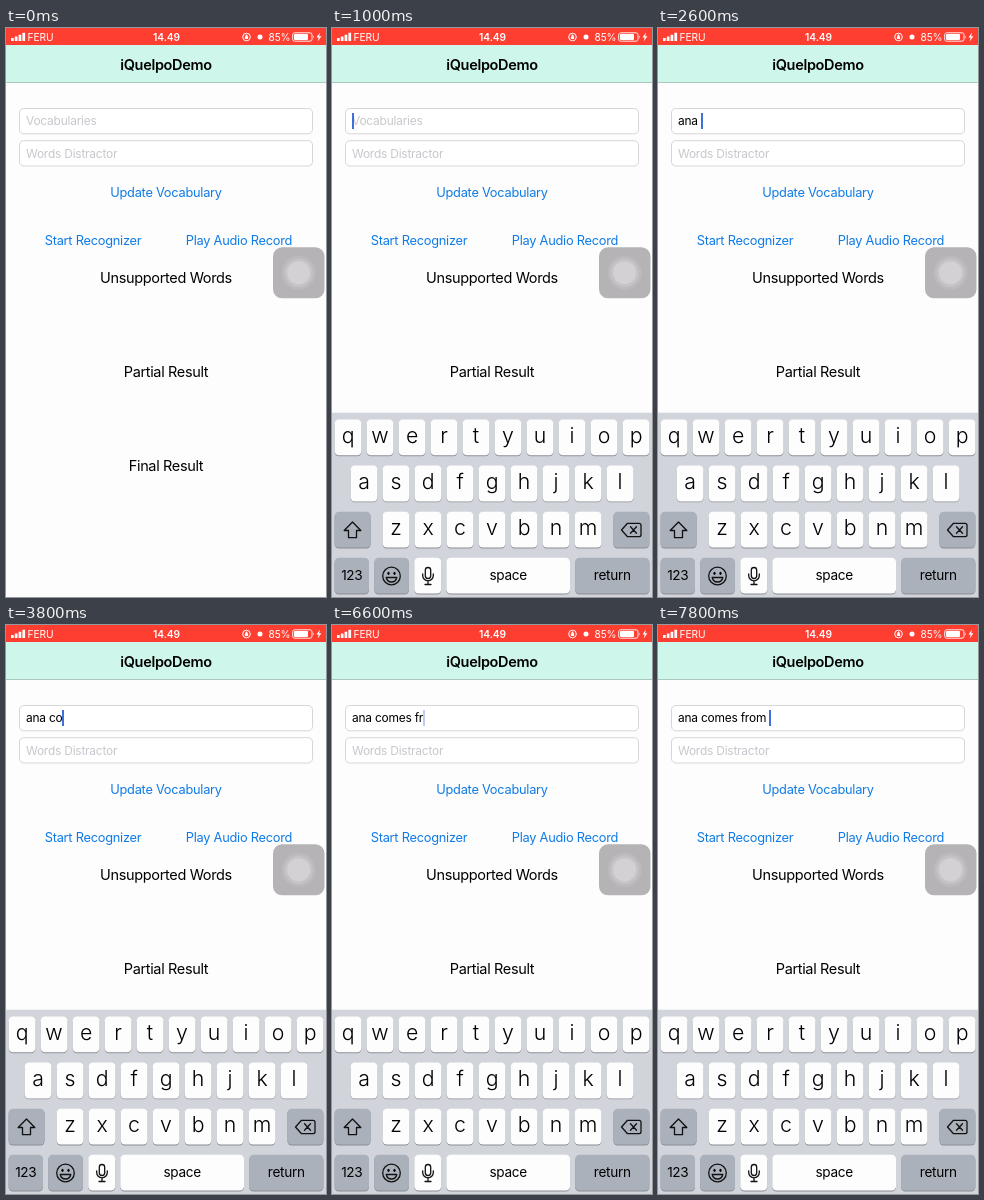
Recreate the animation shown at these times as an HTML page. Size 320 by 569 pixels, loop 8000 ms.

```html
<!DOCTYPE html>
<html lang="en">
<head>
<meta charset="utf-8">
<title>Recognizer demo</title>
<style>
  html, body { margin: 0; width: 100%; height: 100%; overflow: hidden; background: #fdfdfe; }
  #stage { position: absolute; left: 0; top: 0; width: 320px; height: 569px; overflow: hidden; }
  svg { position: absolute; left: 0; top: 0; }
  svg, #input { font-family: Inter, Roboto, "Liberation Sans", sans-serif; }
  text { text-anchor: middle; }
  .status text { font-size: 10.2px; fill: #fff; letter-spacing: -.1px; }
  .title { font-size: 14.5px; font-weight: 600; letter-spacing: -.33px; }
  .label { font-size: 14.5px; letter-spacing: -.35px; }
  .button { font-size: 12.8px; letter-spacing: -.25px; fill: #0f7be6; }
  .hint { font-size: 11.95px; letter-spacing: -.22px; fill: #c7c7cd; text-anchor: start; }
  .field { fill: #fff; stroke: #d6d6d9; }
  .letter { font-size: 21.3px; font-weight: 300; }
  .word { font-size: 13.6px; letter-spacing: -.3px; }
  .line { fill: none; stroke: #111; stroke-width: 1.3; stroke-linejoin: round; stroke-linecap: round; }
  #popup { filter: drop-shadow(0 1px 1.5px #0006); }
  #popup text { font-size: 32px; font-weight: 300; }
  #input {
    position: absolute; left: 20px; top: 85px; height: 16px; white-space: pre;
    font-size: 11.95px; line-height: 16px; letter-spacing: -.22px; color: #000;
  }
  #caret {
    position: absolute; left: 100%; top: 0; width: 1.8px; height: 15.5px;
    background: #3f6fdb;
  }
</style>
</head>
<body>
<div id="stage">
  <svg width="320" height="569" viewBox="0 0 320 569">
    <rect width="320" height="569" fill="#fdfdfe"/>
    <rect y="17" width="320" height="38" fill="#cef6ea"/>
    <rect y="54.2" width="320" height=".8" fill="#a3bdb6"/>
    <g class="status">
      <rect width="320" height="17" fill="#ff3e32"/>
      <path d="M5 10h2.7v3H5zM8.8 8.5h2.7V13H8.800zM12.600 6.700h2.700V13h-2.700zM16.400 4.700h2.700V13h-2.700z" fill="#fff"/>
      <text x="34.500" y="12.700">FERU</text>
      <text x="160.500" y="12.700" font-weight="600">14.49</text>
      <circle cx="240.500" cy="9" r="3.800" fill="none" stroke="#fff"/>
      <path d="M238.900 8.500h3.200v2.500h-3.200zM239.500 8.500v-1a1 1 0 0 1 2 0v1" fill="#fff"/>
      <circle cx="254" cy="9" r="2.500" fill="#fff"/>
      <text x="273.500" y="12.700">85%</text>
      <rect x="286.700" y="4.800" width="19.300" height="8.400" rx="2" fill="none" stroke="#fff" stroke-width=".9"/>
      <rect x="288" y="6.100" width="14" height="5.800" rx=".8" fill="#fff"/>
      <path d="M307 7.500q1.500 1.500 0 3zM314 4.500l-3.500 5h2.200l-1 4 3.700-5.200h-2.300z" fill="#fff"/>
    </g>
    <text class="title" x="160" y="41.800">iQuelpoDemo</text>

    <rect class="field" x="13.500" y="80.500" width="293" height="25.300" rx="4.300"/>
    <rect class="field" x="13.500" y="112.700" width="293" height="25.300" rx="4.300"/>
    <text class="hint" id="hint" x="20" y="97.200">Vocabularies</text>
    <text class="hint" x="20" y="129.700">Words Distractor</text>

    <text class="button" x="160" y="169.400">Update Vocabulary</text>
    <text class="button" x="87" y="217">Start Recognizer</text>
    <text class="button" x="233" y="217">Play Audio Record</text>
    <text class="label" x="160" y="255">Unsupported Words</text>
    <text class="label" x="160" y="348.500">Partial Result</text>
    <text class="label" x="160" y="442.500">Final Result</text>

    <rect x="267" y="219.300" width="51.500" height="51" rx="9" fill="#b5b3b5"/>
    <g transform="translate(292.600 244.800)">
      <circle r="17" fill="#bcbabc"/>
      <circle r="14.300" fill="#c5c3c5"/>
      <circle r="11.600" fill="#d3d1d3"/>
    </g>

    <g id="keyboard">
      <rect y="384.700" width="320" height="192" fill="#d1d4da"/>
      <g id="keys"></g>
      <path class="line" d="M20.500 494l8.300 8.500h-4.300v7.200h-8v-7.200h-4.300z"/>
      <path class="line" d="M289.500 502l6-6.700h11.500q2 0 2 2v9.400q0 2-2 2h-11.500zM298.500 498.800l6 6.400m0-6.400l-6 6.400"/>
      <g transform="translate(59.500 548)">
        <circle class="line" r="8.800"/>
        <ellipse cx="-3" cy="-2.700" rx="1.100" ry="1.600"/>
        <ellipse cx="3" cy="-2.700" rx="1.100" ry="1.600"/>
        <path class="line" d="M-5.300 1.500H5.300Q4.300 6 0 6T-5.300 1.500z"/>
      </g>
      <g transform="translate(96 548)">
        <rect class="line" x="-2.700" y="-8.500" width="5.400" height="11" rx="2.700"/>
        <path class="line" d="M-5.300-2v1.500a5.300 5.300 0 0 0 10.600 0V-2M0 5v3.500M-3 8.500h6"/>
      </g>
      <g id="popup">
        <path fill="#fdfdfd" d="M-11.500-48Q-11.500-56-3.500-56H30.400Q38.400-56 38.400-48V-17C38.400-8 26.900-9 26.900 1V32Q26.900 36 22.900 36H4Q0 36 0 32V1C0-9-11.500-8-11.500-17Z"/>
        <text x="13.450" y="-20.800"></text>
      </g>
    </g>
  </svg>
  <div id="input"><span id="typed"></span><i id="caret"></i></div>
</div>
<script>
  const $ = id => document.getElementById(id);
  const LOOP = 8000, PHRASE = 'ana comes from ';
  const KEY_W = 26.9, KEY_H = 35.8, PITCH = 32, GREY = '#abb1bb';
  const rowY = r => 391.5 + r * 46.1;
  const keyAt = {};

  function add(tag, attrs, text = '') {
    const el = document.createElementNS('http://www.w3.org/2000/svg', tag);
    for (const k in attrs) el.setAttribute(k, attrs[k]);
    el.textContent = text;
    return $('keys').appendChild(el);
  }

  function addKey(x, row, width, fill, label = '', cls = 'word') {
    const y = rowY(row);
    const box = { x, width, height: KEY_H, rx: 4.3 };
    add('rect', { ...box, y: y + 0.9, fill: '#8b8e94' });
    const face = add('rect', { ...box, y, fill });
    const baseline = y + (cls === 'letter' ? 23.5 : 22.6);
    add('text', { x: x + width / 2, y: baseline, class: cls }, label);
    return face;
  }

  [['qwertyuiop', 2.6], ['asdfghjkl', 18.6], ['zxcvbnm', 50.6]].forEach(([letters, left], row) => {
    [...letters].forEach((ch, i) => {
      const x = left + i * PITCH;
      keyAt[ch] = [x, rowY(row)];
      addKey(x, row, KEY_W, '#fdfdfd', ch, 'letter');
    });
  });
  addKey(2.6, 2, 36, GREY);
  addKey(281.4, 2, 36, GREY);
  addKey(2.6, 3, 34.4, GREY, '123');
  addKey(42.3, 3, 34.6, GREY);
  addKey(82.3, 3, KEY_W, '#fdfdfd');
  const space = addKey(114.3, 3, 123.7, '#fdfdfd', 'space');
  addKey(243.2, 3, 74.2, GREY, 'return');

  // [start ms, letters typed, pressed: 'key' | 'space' | '', caret opacity]
  const STEPS = [
    [0, 0, '', 0], [800, 0, '', 1], [1200, 0, '', .4], [1400, 0, '', 0], [1600, 0, '', 1],
    [1800, 1, 'key', 1], [2000, 2, 'key', 1], [2200, 3, 'key', 1], [2400, 3, 'space', 1],
    [2600, 4, '', 1], [3000, 4, '', 0],
    [3400, 5, 'key', 1], [3600, 6, 'key', 1], [3800, 6, '', 1],
    [4200, 7, 'key', 1], [4400, 8, 'key', 1], [4600, 9, 'key', 1], [4800, 9, 'space', 1],
    [5000, 10, '', 1], [5400, 10, '', 0],
    [6000, 11, 'key', 1], [6200, 12, 'key', 1], [6600, 12, '', .35],
    [6800, 13, 'key', 1], [7000, 13, '', 1], [7200, 14, 'key', 1], [7400, 14, '', 1],
    [7600, 14, 'space', 1], [7800, 15, '', 1]
  ];
  const show = (el, on) => { el.style.display = on ? '' : 'none'; };
  const popup = $('popup'), popupLetter = popup.querySelector('text');
  let current;

  function draw(t) {
    const step = STEPS.findLast(s => s[0] <= t);
    const slide = t < 1000 ? 7.2 : 0;
    show($('keyboard'), t >= 800);
    $('keyboard').setAttribute('transform', `translate(0 ${slide})`);
    if (step === current) return;
    current = step;

    const [, count, pressed, caret] = step;
    $('typed').textContent = PHRASE.slice(0, count);
    show($('hint'), count === 0);
    $('caret').style.opacity = caret;
    space.setAttribute('fill', pressed === 'space' ? GREY : '#fdfdfd');
    show(popup, pressed === 'key');
    if (pressed === 'key') {
      const ch = PHRASE[count - 1];
      popup.setAttribute('transform', `translate(${keyAt[ch]})`);
      popupLetter.textContent = ch;
    }
  }

  const start = performance.now();
  function tick() {
    draw((performance.now() - start) % LOOP);
    requestAnimationFrame(tick);
  }
  tick();
</script>
</body>
</html>
```
